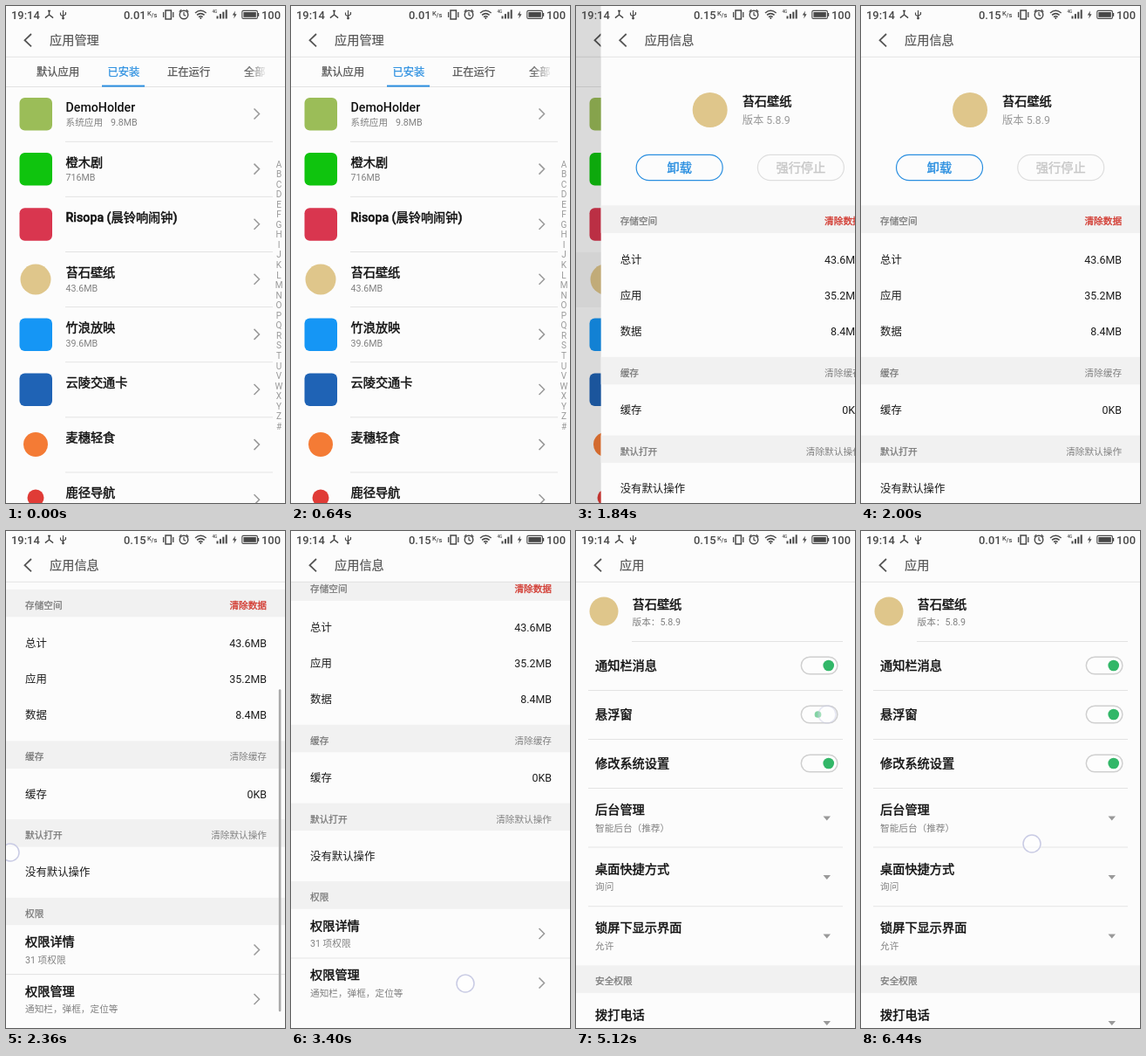
These frames come from a looping animation (320x569 px, 6.48 s). An HTML page:

```html
<!DOCTYPE html>
<html lang="zh-CN">
<head>
<meta charset="utf-8">
<style>
html, body { margin: 0; width: 100%; height: 100%; overflow: hidden; background: #fcfcfc; }
svg { display: block; width: 100vw; height: 100vh; font-family: Roboto, "Noto Sans CJK SC", "Noto Sans CJK", sans-serif; }
text { white-space: pre; }
</style>
</head>
<body>
<svg id="stage" viewBox="0 0 320 569"></svg>
<script>
const LOOP = 6480;
const BLUE = '#2b8fe0', GREEN = '#32b768', GOLD = '#dfc68b', PAPER = '#fcfcfc';
const APP = '苔石壁纸';

const text = (x, y, s, size, fill, extra = '') =>
  `<text x="${x}" y="${y}" font-size="${size}" fill="${fill}" ${extra}>${s}</text>`;
// The CJK font has no medium weight, so a thin outline stands in for it.
const medium = (s, color, width = 0.45) => 'font-weight="500"' +
  (/[一-龥]/.test(s) ? ` stroke="${color}" stroke-width="${width}"` : '');
const title = (x, y, s) => text(x, y - 0.4, s, 14.2, '#111', medium(s, '#111'));
const note = (x, y, s, extra) => text(x, y, s, 10.65, '#808080', extra);
const body = (x, y, s, extra) => text(x, y, s, 12.4, '#1c1c1c', extra);
const rect = (x, y, w, h, fill, extra = '') =>
  `<rect x="${x}" y="${y}" width="${w}" height="${h}" fill="${fill}" ${extra}/>`;
const circle = (x, y, r, fill, extra = '') =>
  `<circle cx="${x}" cy="${y}" r="${r}" fill="${fill}" ${extra}/>`;
const path = (d, stroke, width, extra = '') =>
  `<path d="${d}" fill="none" stroke="${stroke}" stroke-width="${width}" ${extra}/>`;
const rule = (y, x1 = 0, x2 = 306) => path(`M${x1} ${y}H${x2}`, '#dedede', 0.8);
const chevron = y => path(`M284.5 ${y - 6}l6 6l-6 6`, '#999', 1.5);
const arrow = y => `<path d="M283.5 ${y - 2}h8.5l-4.25 5z" fill="#999"/>`;
const band = (y, label) => rect(0, y, 320, 31.5, '#f1f1f1') +
  text(22, y + 22, label, 10.65, '#777', medium(label, '#777', 0.25));
const END = 'text-anchor="end"', MID = 'text-anchor="middle"';

const header = name => rect(0, 0, 320, 58, PAPER) +
  path('M29 32l-7.5 7.2l7.5 7.2', '#555', 1.8) +
  text(50, 44.3, name, 14.2, '#555', medium(name, '#555', 0.2));

function listPage() {
  const apps = [
    ['DemoHolder', '系统应用', '#9bbd58'],
    ['橙木剧', '716MB', '#0fc40e'],
    ['Risopa (晨铃响闹钟)', '', '#d9364f'],
    [APP, '43.6MB', GOLD],
    ['竹浪放映', '39.6MB', '#1596f5'],
    ['云陵交通卡', '', '#1f63b5'],
    ['麦穗轻食', '', '#f47b35'],
    ['鹿径导航', '', '#e03b36'],
  ];
  const icon = (i, fill) => {
    if (i === 3) return circle(34, 313, 17.5, fill);
    if (i === 6) return circle(34, 502, 14, fill);
    if (i === 7) return circle(34, 563, 9.5, fill);
    return rect(15.5, 105 + 63.1 * i, 37.5, 37.5, fill, 'rx="6"');
  };
  const rows = apps.map(([name, info, fill], i) => {
    const y = 63.1 * i;
    return icon(i, fill) + title(68.5, 121 + y, name) + note(68.5, 137.2 + y, info) +
      chevron(123.5 + y) + rule(155.3 + y, 68);
  }).join('');
  const letters = [...'ABCDEFGHIJKLMNOPQRSTUVWXYZ#']
    .map((c, i) => text(313, 184.5 + 11.55 * i, c, 10, '#999', MID)).join('');
  const tab = (x, s, fill) => text(x, 80.3, s, 12.3, fill, medium(s, fill, 0.25));
  return rect(0, 0, 320, 569, PAPER) +
    rect(0, 281.8, 320, 63.2, '#f4f4f4', 'id="rowPress"') + rows +
    note(120, 137.2, '9.8MB') + letters + header('应用管理') + rule(58.3, 0, 320) +
    tab(35, '默认应用', '#555') + tab(116.5, '已安装', BLUE) + tab(185, '正在运行', '#555') +
    tab(273, '全部', 'url(#fade)') + rule(92.5, 0, 320) + rect(110, 90.6, 49, 2, BLUE);
}

function infoPage() {
  const button = (x, s, stroke, fill) =>
    rect(x, 170.3, 99, 29.4, 'none', `rx="14.7" stroke="${stroke}" stroke-width="1.2"`) +
    text(x + 49.5, 190, s, 14.2, fill, MID + ' ' + medium(s, fill));
  const pair = (y, label, value) => body(22, y, label) + body(299, y, value, END);
  return rect(0, 0, 320, 569, PAPER) + '<g id="scroller">' +
    circle(125, 119, 20, GOLD) + title(162, 114.5, APP) +
    text(162, 135, '版本 5.8.9', 12.3, '#999') +
    button(40.5, '卸载', BLUE, BLUE) + button(179.7, '强行停止', '#dedede', '#c8c8c8') +
    band(228.3, '存储空间') +
    text(299, 250.3, '清除数据', 10.65, '#d23a31', END + ' ' + medium('清除数据', '#d23a31', 0.35)) +
    pair(294.5, '总计', '43.6MB') + pair(335.5, '应用', '35.2MB') + pair(376.5, '数据', '8.4MB') +
    band(401.8, '缓存') + note(299, 423.8, '清除缓存', END) + pair(467, '缓存', '0KB') +
    band(491.6, '默认打开') + note(299, 513.6, '清除默认操作', END) + body(22, 556.5, '没有默认操作') +
    band(581.2, '权限') +
    title(22, 637, '权限详情') + note(22, 656, '31 项权限') + chevron(641) +
    rect(0, 669, 320, 57, '#f4f4f4', 'id="permPress"') + rule(669, 0, 320) +
    title(22, 693.5, '权限管理') + note(22, 712.5, '通知栏，弹框，定位等') + chevron(697.5) +
    '</g>' + rect(312.8, 0, 2.6, 369, '#aaa', 'id="bar" rx="1.3"') +
    header('应用信息') + rule(58.3, 0, 320);
}

function permPage() {
  const toggle = (y, id) =>
    rect(258.3, y - 9.8, 41.6, 19.6, '#fdfdfd', 'rx="9.8" stroke="#d0d0d0" stroke-width="1.5"') +
    circle(289.7, y, 6.3, GREEN, id ? `id="${id}"` : '');
  const choice = (y, name, value) => title(22, y, name) + note(22, y + 19, value) + arrow(y + 4);
  return rect(0, 0, 320, 569, PAPER) + header('应用') + rule(58.3, 0, 320) +
    circle(32, 92, 16.5, GOLD) + title(64.5, 89, APP) + note(64.5, 108, '版本：5.8.9') +
    rule(126.5, 64) + [182.5, 238.5, 294.5, 362, 429.7].map(y => rule(y, 14)).join('') +
    title(22, 159.5, '通知栏消息') + toggle(154) +
    title(22, 215.5, '悬浮窗') + toggle(210, 'knob') +
    title(22, 271.5, '修改系统设置') + toggle(266) +
    choice(324.5, '后台管理', '智能后台（推荐）') + choice(392, '桌面快捷方式', '询问') +
    choice(459.5, '锁屏下显示界面', '允许') +
    band(497.3, '安全权限') + title(22, 559, '拨打电话') + arrow(563);
}

function statusBar() {
  const ink = '#484848', bold = 'font-weight="500"';
  const bars = [0, 1, 2, 3].map(i => rect(241.5 + 3.4 * i, 11.5 - 2.4 * i, 2, 3 + 2.4 * i, ink)).join('');
  return text(6, 14.5, '19:14', 12.9, ink, bold) +
    path('M49.5 5v5l-4.6 3.6M49.5 10l4.6 3.6M48 5.5h3', ink, 1.5) +
    path('M65.5 5v9.5M62.5 7.5v2.5l3 2M68.5 7v2.5l-3 2', ink, 1.1) + circle(65.5, 14, 1.4, ink) +
    text(135, 14.5, '0.01', 12.9, ink, bold + ' id="speed"') +
    text(162, 11, 'K', 7.5, ink, bold) + text(166.5, 13, '/s', 7.5, ink, bold) +
    rect(183, 5, 6.4, 10, 'none', `stroke="${ink}" stroke-width="1.5"`) +
    path('M180.6 7v6M191.8 7v6', ink, 1.3) +
    circle(204, 10, 4.8, 'none', `stroke="${ink}" stroke-width="1.4"`) +
    path('M204 7v3.3l2.2 1M198.7 6.6l2.6-2.4M209.3 6.6l-2.6-2.4', ink, 1.2) +
    path('M217 8q6.3-5.4 12.6 0M219 10.4q4.3-3.6 8.6 0M221 12.6q2.3-1.8 4.6 0', ink, 1.5) +
    circle(223.3, 14, 1, ink) + text(236.5, 8, '4G', 4.6, ink, bold) + bars +
    `<path d="M263 5.5l-3.2 5h2.2l-.8 4l3.4-5.3h-2.2z" fill="${ink}"/>` +
    rect(270.8, 5.4, 17.6, 9, 'none', `rx="1.4" stroke="${ink}" stroke-width="1.1"`) +
    rect(272.4, 7, 14.4, 5.8, ink) + rect(288.8, 8, 1.4, 3.8, ink) +
    text(293, 14.5, '100', 12.9, ink, bold);
}

const shade = id => rect(0, 0, 320, 569, '#000', `id="${id}"`);
document.getElementById('stage').innerHTML =
  `<defs><linearGradient id="fade" gradientUnits="userSpaceOnUse" x1="276" x2="300" y1="0" y2="0">
    <stop stop-color="#555"/><stop offset="1" stop-color="${PAPER}"/></linearGradient></defs>` +
  `<g>${listPage()}</g>${shade('shade1')}<g id="info">${infoPage()}</g>${shade('shade2')}` +
  `<g id="perm">${permPage()}</g>${statusBar()}` +
  circle(0, 0, 10, '#fff', 'id="touch" fill-opacity=".6" stroke="#c9cbe4" stroke-width="1.5"');

const el = id => document.getElementById(id);
const set = (id, attrs) => { for (const k in attrs) el(id).setAttribute(k, attrs[k]); };
const show = (id, on) => set(id, { visibility: on ? 'visible' : 'hidden' });
const phase = (t, start, span) => Math.min(1, Math.max(0, (t - start) / span));
const easeOut = (p, power) => 1 - (1 - p) ** power;
const within = (t, a, b) => t >= a && t < b;

function slide(page, dim, p) {
  set(page, { transform: `translate(${320 * (1 - p)} 0)`, display: p > 0 ? 'inline' : 'none' });
  set(dim, { opacity: 0.15 * p });
}

function touchAt(t, scroll) {
  if (within(t, 1440, 1560)) return [200, 316];
  if (within(t, 2080, 2400)) {
    const drag = Math.min(161, scroll);
    return [65 - 60 * drag / 161, 529 - drag];
  }
  if (within(t, 3400, 3520)) return [200, 518];
  if (within(t, 4960, 5160)) return [288, 210];
  if (t >= 6280) return [196, 358];
  return null;
}

function draw(t) {
  slide('info', 'shade1', easeOut(phase(t, 1620, 400), 3));
  slide('perm', 'shade2', easeOut(phase(t, 3526, 400), 3));
  show('rowPress', within(t, 1480, 2040));
  show('permPress', within(t, 3440, 3640));

  const scroll = 180 * easeOut(phase(t, 2120, 355), 2);
  set('scroller', { transform: `translate(0 ${-scroll})` });
  set('bar', { y: 62 + 0.739 * scroll, opacity: t < 2120 ? 0 : 1 - phase(t, 2800, 240) });

  const grow = phase(t, 5080, 120), move = easeOut(phase(t, 5130, 150), 2);
  set('knob', {
    cx: 277.5 + 12.2 * move,
    r: 2.6 + 3.7 * grow,
    fill: t < 5080 ? '#ccc' : GREEN,
    opacity: t < 5080 ? 1 : 0.4 + 0.6 * grow,
  });

  el('speed').textContent = within(t, 1760, 5280) ? '0.15' : '0.01';
  const spot = touchAt(t, scroll);
  show('touch', spot);
  if (spot) set('touch', { cx: spot[0], cy: spot[1], opacity: within(t, 4960, 5160) ? 0.45 : 1 });
}

const start = performance.now();
function tick() {
  draw((performance.now() - start) % LOOP);
  requestAnimationFrame(tick);
}
draw(0);
requestAnimationFrame(tick);
</script>
</body>
</html>
```
